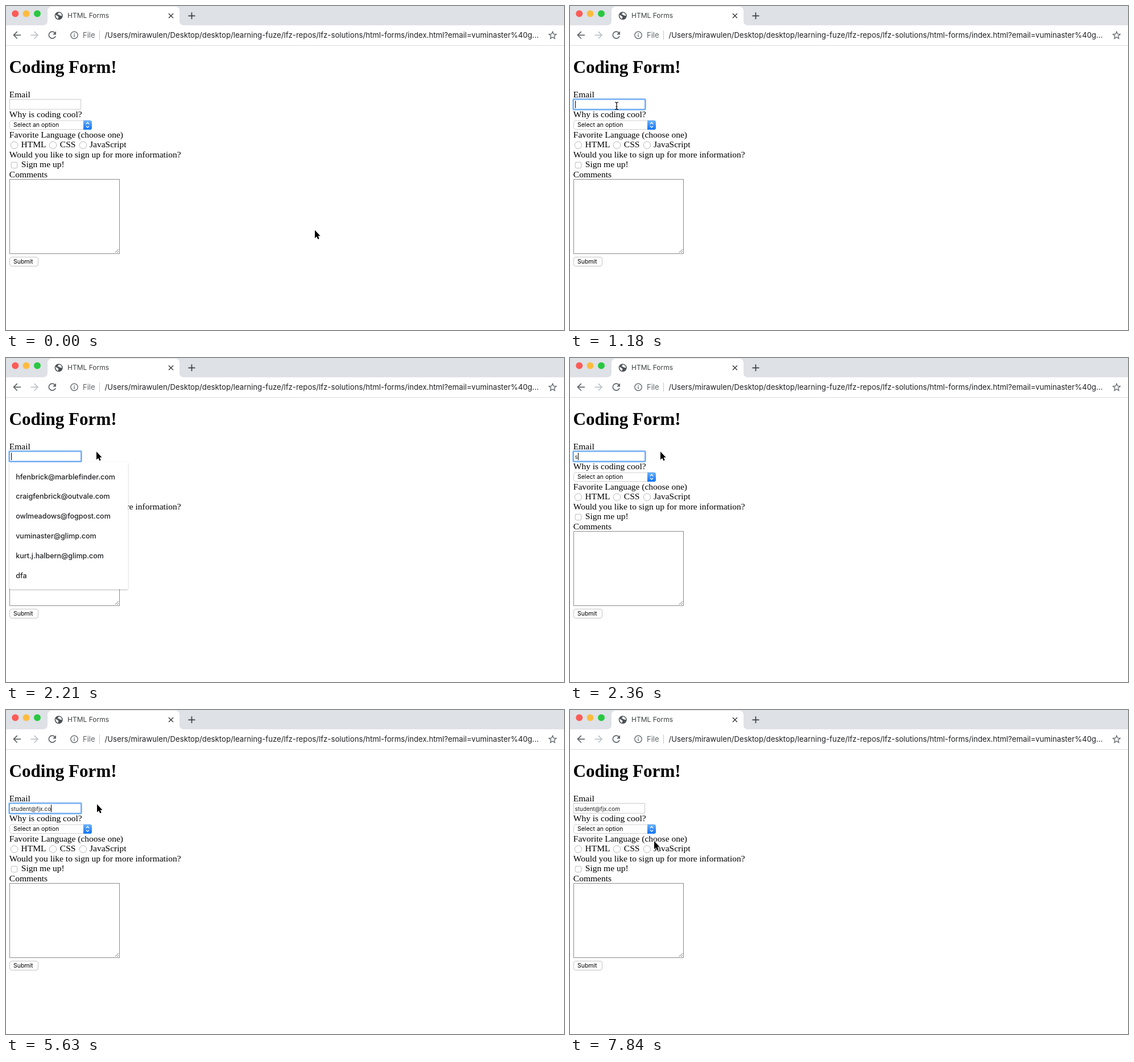
Write an HTML page that moves like this. It is 981 px wide and 571 px high and loops after 7990 ms.

```html
<!DOCTYPE html>
<html lang="en">
<head>
<meta charset="utf-8">
<title>HTML Forms</title>
<style>
html, body { margin: 0; width: 100%; height: 100%; overflow: hidden; background: #fff; }
svg { display: block; }
text { white-space: pre; }
.ui { font-family: Inter, sans-serif; fill: #202124; }
.page { font: 15.5px "Liberation Serif", serif; }
.small { font-size: 10.5px; fill: #000; }
.line { fill: none; stroke: #5f6368; stroke-width: 1.7; }
.box { fill: #fff; stroke: #b8b8b8; }
</style>
</head>
<body>
<svg width="981" height="571" viewBox="0 0 981 571">
  <defs>
    <linearGradient id="blue" x2="0" y2="1">
      <stop stop-color="#6cb3fa"/><stop offset="1" stop-color="#1173f5"/>
    </linearGradient>
    <filter id="shadow" x="-10%" y="-10%" width="120%" height="120%">
      <feDropShadow dx="0" dy="1" stdDeviation="1.3" flood-opacity=".35"/>
    </filter>
  </defs>

  <!-- Browser bar -->
  <rect width="981" height="34" fill="#dee1e6"/>
  <path d="M65 34q8 0 8-8V9q0-8 8-8H297q8 0 8 8V26q0 8 8 8Z" fill="#fff"/>
  <circle cx="16.3" cy="13.6" r="6" fill="#fc5b57"/>
  <circle cx="35.6" cy="13.6" r="6" fill="#fdbc40"/>
  <circle cx="55" cy="13.6" r="6" fill="#28c840"/>
  <circle cx="92.7" cy="17.2" r="7" fill="#4d5156"/>
  <path d="M87 15.5l4 2.2 1.5 1.8-1.2 3.2q-4-1-4.3-7.2ZM93 11.5l4 1.5 1.5 4.5-3.5-.7-2.5-1.5-2-.6Z" fill="#fff"/>
  <g class="ui">
    <text x="108" y="21" font-size="12" fill="#3c4043">HTML Forms</text>
    <text x="135" y="56" font-size="13" fill="#5f6368">File</text>
    <text x="173.5" y="56" font-size="13.2">/Users/mirawulen/Desktop/desktop/learning-fuze/lfz-repos/lfz-solutions/html-forms/index.html?email=vuminaster%40g...</text>
  </g>
  <g class="line">
    <path d="M286 13.2l8 8m0-8l-8 8" stroke="#3c4043" stroke-width="1.5"/>
    <path d="M320.5 17.3h12m-6-6v12" stroke="#3c4043"/>
    <path d="M26 51.3H13.5m6.2-6.2-6.2 6.2 6.2 6.2"/>
    <path d="M43.5 51.3H56m-6.2-6.2 6.2 6.2-6.2 6.2" stroke="#bdc1c6"/>
    <path d="M86 47.4A6 6 0 1 0 87 53"/>
    <path d="M88 44.5v6h-6Z" fill="#5f6368" stroke="none"/>
    <circle cx="120" cy="51.3" r="6.2" stroke-width="1.3"/>
    <path d="M120 50.5v4m0-6.5v1.5" stroke-width="1.4"/>
    <path d="M164.5 43.5v16" stroke="#c4c7cb" stroke-width="1"/>
    <path d="M961 45.2l1.8 4.2 4.5.4-3.4 3 1 4.5-3.9-2.4-3.9 2.4 1-4.5-3.4-3 4.5-.4Z" stroke-width="1.3"/>
    <path d="M0 69.5H981" stroke="#dcdcdc" stroke-width="1"/>
  </g>

  <!-- Form -->
  <g class="page">
    <text x="5.5" y="118" font-size="31.1" font-weight="bold">Coding Form!</text>
    <text x="5.8" y="160.5">Email</text>
    <text x="5.8" y="196">Why is coding cool?</text>
    <text x="5.8" y="232">Favorite Language (choose one)</text>
    <text x="26.6" y="249.3">HTML</text>
    <text x="94.8" y="249.3">CSS</text>
    <text x="147" y="249.3">JavaScript</text>
    <text x="5.8" y="266.8">Would you like to sign up for more information?</text>
    <text x="26.8" y="284.2">Sign me up!</text>
    <text x="5.8" y="301.6">Comments</text>
  </g>
  <rect class="box" x="6.5" y="164.5" width="125" height="17.5" style="stroke:#ccc"/>
  <rect class="box" x="6.5" y="202" width="144" height="15.5" rx="3.5" style="stroke:#d0d0d0"/>
  <path d="M136 201.5h11.5q3.5 0 3.5 3.5v9.5q0 3.5-3.5 3.5H136Z" fill="url(#blue)"/>
  <path d="M141 208l2.5-2.7 2.5 2.7m-5 3.6l2.5 2.7 2.5-2.7" fill="none" stroke="#fff" stroke-width="1.3"/>
  <circle class="box" cx="14.5" cy="245.2" r="6.3"/>
  <circle class="box" cx="82.5" cy="245.2" r="6.3"/>
  <circle class="box" cx="135.5" cy="245.2" r="6.3"/>
  <rect class="box" x="9.2" y="275.2" width="10.6" height="10.6" rx="2.5"/>
  <rect class="box" x="6.5" y="305.5" width="193" height="131" style="stroke:#8c8c8c"/>
  <path d="M191.5 435l6.5-6.5m-3 6.5l3-3" stroke="#777"/>
  <rect class="box" x="6.5" y="442.5" width="50" height="16" rx="3.5" style="stroke:#c4c4c4"/>
  <g class="ui">
    <text class="small" x="13" y="213.4">Select an option</text>
    <text class="small" x="13" y="454.2">Submit</text>
  </g>

  <!-- Changing parts -->
  <g id="ring" fill="none">
    <rect x="5.5" y="164" width="127" height="18.7" rx="1.5" stroke="#a9cdf8" stroke-width="3"/>
    <rect x="6" y="164.5" width="126" height="17.7" rx="1" stroke="#64a6f2" stroke-width="1.6"/>
  </g>
  <text id="typed" class="ui" x="8.6" y="177.5" font-size="9.9"></text>
  <rect id="caret" y="167" width="1" height="13"/>
  <g id="menu" class="ui" font-size="12.5" font-weight="500">
    <rect x="6" y="184" width="208.5" height="223.5" rx="2.5" fill="#fff" filter="url(#shadow)"/>
  </g>
  <path id="arrow" d="M0 0V14.2L3.2 11.3 5.3 16 7.7 15 5.6 10.3H9.6Z" stroke="#fff" stroke-width="1.2" paint-order="stroke"/>
  <path id="beam" d="M-3-6.5q3 0 3 2 0-2 3-2M0-5V5M-3 6.5q3 0 3-2 0 2 3 2M-1.5 1.5h3" fill="none" stroke="#000" stroke-width="1.2"/>
</svg>
<script>
const $ = id => document.getElementById(id);
const show = (id, on) => $(id).style.display = on ? "" : "none";

const emails = ["hfenbrick@marblefinder.com", "craigfenbrick@outvale.com",
  "owlmeadows@fogpost.com", "vuminaster@glimp.com", "kurt.j.halbern@glimp.com", "dfa"];
emails.forEach((mail, i) => {
  const row = document.createElementNS("http://www.w3.org/2000/svg", "text");
  row.setAttribute("x", 17.2);
  row.setAttribute("y", 213.6 + i * 34.8);
  row.textContent = mail;
  $("menu").append(row);
});

// The screen refreshes in ticks; all times below count them
const LOOP = 7990, TICK = LOOP / 54;
const FOCUS = 8, TYPE = 16, BLUR = 49, BLINK = 3.4;

// Keys pressed in each tick; an empty entry is a pause
const keys = "s t  u d  en t    @    fj  x  .   co m".split(" ");

// Pointer strokes: each curves from the last end point past a control point
const strokes = [
  { from: 0, to: 5, via: [200, 105], end: [139, 161] },
  { from: 5, to: 8, via: [100, 172], end: [82, 176] },
  { from: 9, to: 13, via: [140, 156], end: [159, 165] },
  { from: 18, to: 19, via: [160, 165], end: [160, 166] },
  { from: 45, to: 48, via: [220, 155], end: [240, 161] },
  { from: 48, to: 53, via: [250, 232], end: [148, 231] },
];

function pointerAt(tick) {
  let pos = [543, 395];
  for (const { from, to, via, end } of strokes) {
    const k = Math.min(1, Math.max(0, (tick - from) / (to - from)));
    const u = k * k * (3 - 2 * k), v = 1 - u;
    pos = pos.map((p, i) => v * v * p + 2 * u * v * via[i] + u * u * end[i]);
  }
  return pos;
}

function draw(now) {
  const tick = Math.floor((now % LOOP + 10) / TICK) % 54;
  const pressed = keys.slice(0, Math.max(0, tick - TYPE + 1));
  const lastKey = pressed.findLastIndex(Boolean);
  const lastEdit = lastKey < 0 ? FOCUS : TYPE + lastKey;
  const focused = tick >= FOCUS && tick < BLUR;

  $("typed").textContent = pressed.join("");
  $("caret").setAttribute("x", Math.round(8.6 + $("typed").getComputedTextLength()));
  show("caret", focused && Math.floor((tick - lastEdit) / BLINK) % 2 === 0);
  show("ring", focused);
  show("menu", tick > FOCUS && tick < TYPE);

  const [x, y] = pointerAt(tick);
  const overField = x < 133 && y > 164 && y < 183;
  show("arrow", !overField);
  show("beam", overField);
  $(overField ? "beam" : "arrow").setAttribute("transform", `translate(${x} ${y})`);
  requestAnimationFrame(draw);
}
requestAnimationFrame(draw);
</script>
</body>
</html>
```
